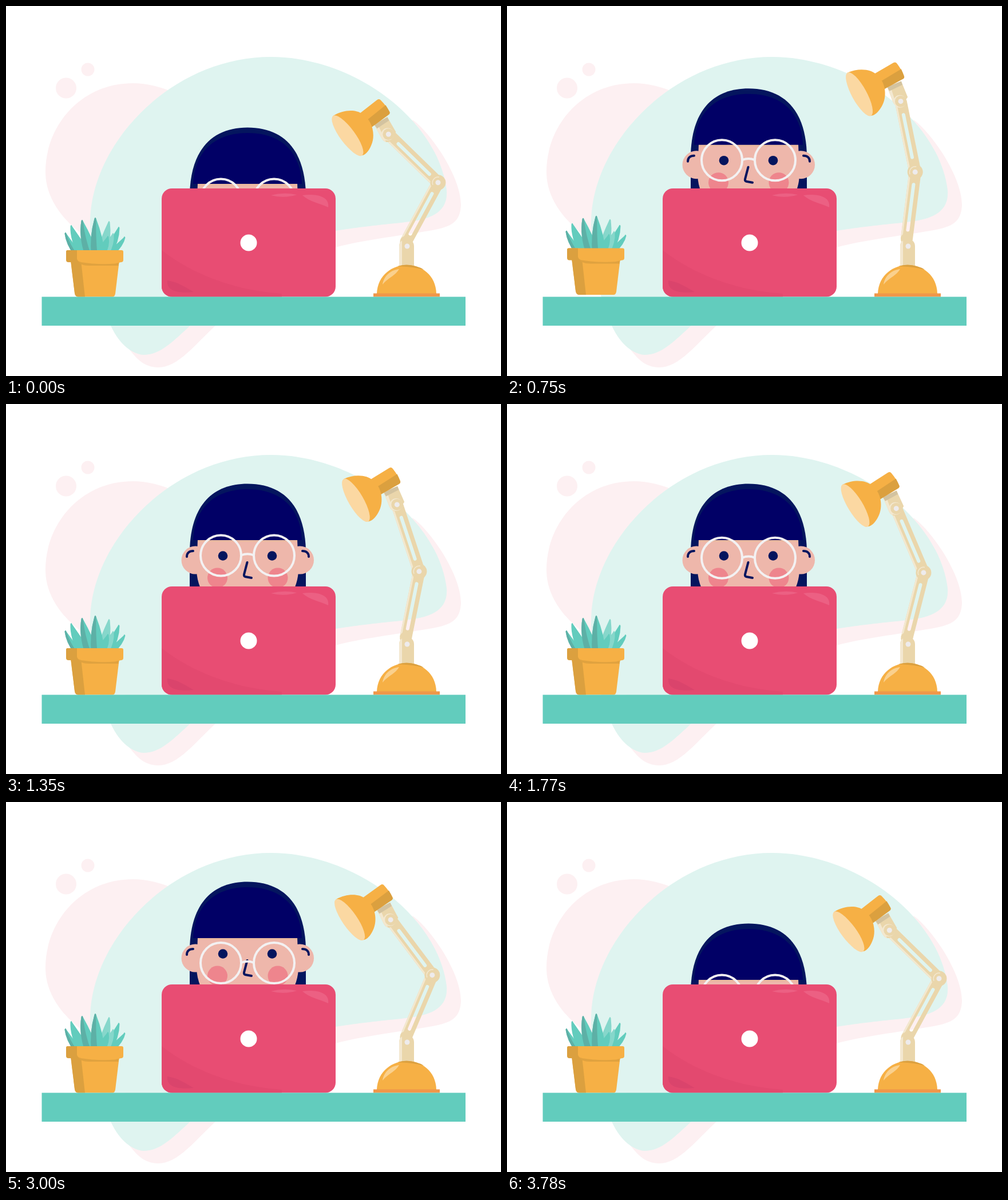
These frames come from a looping animation (865 px wide and 647 px high, 4380 ms). An HTML page:

```html
<!DOCTYPE html>
<html lang="en">
<head>
<meta charset="utf-8">
<title>Peeking over the laptop</title>
<style>
  html, body { margin: 0; width: 100%; height: 100%; overflow: hidden; background: #fff; }
  svg { display: block; width: 100vw; height: 100vh; }
  .amber { fill: #f6b045; }
  .ochre { fill: #dba03f; }
  .sand { fill: #ead6ab; }
  .cream { fill: #f3e8d0; }
  .bolt { fill: #eeebec; }
  .teal { fill: #62ccbd; }
  .deep { fill: #5db0a6; }
  .mint { fill: #86d7cb; }
  .skin { fill: #eeb7ab; }
  .navy { fill: #04155e; }
  .line { fill: none; stroke: #04155e; stroke-width: 4; stroke-linecap: round; stroke-linejoin: round; }
  .frame { fill: none; stroke: #f3f1f2; stroke-width: 4; }
</style>
</head>
<body>
<svg viewBox="0 0 865 647">
  <!-- backdrop -->
  <g fill="#fdf0f2">
    <circle cx="105" cy="143.5" r="18"/>
    <circle cx="143" cy="111" r="11.5"/>
    <path d="M222 135C250 135 280 144 300 155L712 200C745 225 795 300 795 348C794 380 775 387 740 393C680 403 620 410 576 422C480 445 420 510 365 560C330 592 300 633 265 632C240 631 228 616 215 600L165 420C120 395 69 350 69 290C69 210 130 135 222 135Z"/>
  </g>
  <path fill="#dff4f0" d="M463 89C610 89 755 200 770 322C774 372 720 375 690 379C640 384 608 388 576 393C460 415 385 505 322 559C295 583 270 611 240 610C215 608 195 585 183 559C160 510 147 440 147 380C147 240 290 89 463 89Z"/>

  <!-- person -->
  <g id="person">
    <path class="navy" d="M321 335V240C323 160 362 123.500 422 123.500C483 123.500 522 160 524 240V335Z"/>
    <circle class="skin" cx="331" cy="257" r="24.5"/>
    <circle class="skin" cx="513.5" cy="257" r="24.5"/>
    <path class="skin" d="M335 220H509L511 275C510 298 502 313 490 330H354C342 313 334 298 333 275Z"/>
    <path fill="#e9b89f" d="M335 221H509V225H335Z"/>
    <path fill="#010066" d="M327 222C330 162 368 133 422 133C477 133 514 162 517 222Z"/>
    <path class="line" d="M316 251C316 245 320 241 327 241M529 251C529 245 525 241 518 241"/>
    <g fill="#ee858d">
      <circle cx="369.5" cy="288" r="17.5"/>
      <circle cx="475" cy="288" r="17.5"/>
    </g>
    <circle class="navy" cx="379" cy="249.500" r="8.300"/>
    <circle class="navy" cx="465" cy="249.500" r="8.300"/>
    <path class="line" d="M421.500 261L416 282Q415.500 285 418 286L429 288"/>
    <g id="glasses" class="frame">
      <circle cx="375.500" cy="249" r="35.500"/>
      <circle cx="468.500" cy="249" r="35.500"/>
      <path d="M411 248.500Q422 244 433 248.500"/>
    </g>
  </g>

  <!-- plant -->
  <g id="leaves"></g>
  <g id="pot">
    <path class="amber" d="M113 445L120 502Q121 508.500 126 508.500H186Q190 508.500 191 503L198 445Z"/>
    <path class="ochre" d="M113 445H131L138 508.500H126Q121 508.500 120 502Z"/>
    <path fill="#e0a23f" d="M124 445Q129 454 145 454H196.500L198 445Z"/>
    <path class="amber" d="M108 427H202Q205 427 205 430V444Q205 448 201 448L190 450.500Q160 453 124 447L105 444V430Q105 427 108 427Z"/>
    <path class="ochre" d="M108 427H124V442Q125 447 131 448H109Q105 448 105 444V430Q105 427 108 427Z"/>
  </g>

  <!-- lamp -->
  <g id="lower"></g>
  <g id="upper"></g>
  <g id="head">
    <path class="sand" d="M643 207L656 231Q663 243 674 234L681 220L666 194Z"/>
    <path class="cream" d="M643 207L656 231Q660 237 664 238L648 204Z"/>
    <path fill="#d3c3a0" d="M643 207L666 194L669 200L648 214Z"/>
    <path class="amber" d="M616 189L648 164Q652 161 655 165Q664 174 670 185Q671 188 668 190L634 215Z"/>
    <path class="ochre" d="M632 198L663 173Q667 179 670 185Q671 188 668 190L638 212Z"/>
    <path class="amber" d="M571 192C590 180 612 181 621 188C640 198 646 225 638 243C634 253 628 260 622 261Z"/>
    <ellipse fill="#fbd8a2" cx="596.500" cy="226.500" rx="13" ry="43" transform="rotate(-36.500 596.500 226.500)"/>
  </g>
  <g id="joint">
    <circle class="cream" r="11" cx="-1.500"/>
    <circle class="sand" r="10"/>
    <circle class="bolt" r="4.500"/>
  </g>
  <g id="elbow">
    <circle class="sand" r="13.500"/>
    <path fill="none" stroke="#f3e8d0" stroke-width="1.500" d="M-9 4A10 10 0 0 1 2 -9.500"/>
    <circle class="bolt" r="4.500"/>
  </g>
  <path class="sand" d="M687 455V420A13 13 0 0 1 713 420V455Z"/>
  <path class="cream" d="M687 455V420A13 13 0 0 1 692 410V455Z"/>
  <circle class="bolt" cx="701" cy="420" r="4.500"/>
  <path class="amber" d="M648 503C649 470 676 453 700 453C726 453 751 470 752 503Z"/>
  <path class="ochre" d="M684 455Q700 450 716 455Q724 457 730 461Q712 456 684 455Z"/>
  <path fill="#fad08d" d="M658 487C660 473 671 462 687 460C681 471 668 475 658 487Z"/>
  <rect fill="#f0974a" x="642" y="502.500" width="116" height="6"/>

  <!-- laptop and desk -->
  <clipPath id="lid"><rect x="272" y="319" width="304" height="189.500" rx="18"/></clipPath>
  <g clip-path="url(#lid)">
    <rect fill="#e84d73" x="272" y="319" width="304" height="190"/>
    <path fill="#e3496f" d="M272 427C310 457 380 496 482 503V510H272Z"/>
    <path fill="#da446c" d="M282 480C300 482 315 493 328 500C305 502 280 501 282 480Z"/>
    <path fill="#ec6083" d="M463 331Q485 325 508 330Q486 337 463 331ZM518 331C540 328 566 332 563 352C548 345 530 342 518 331Z"/>
  </g>
  <circle cx="424" cy="414" r="14.500" fill="#fff"/>
  <rect class="teal" x="62.500" y="508.500" width="740.500" height="50.500"/>
</svg>
<script>
const LOOP = 4380;
const PIVOT = { x: 680, y: 422, r: 135.8 };
const JOINT = { x: 668, y: 224 };
const SOIL = 436;
const el = id => document.getElementById(id);
const rad = deg => deg * Math.PI / 180;
const clamp = v => Math.max(0, Math.min(1, v));
const part = (t, a, b) => clamp((t - a) / (b - a));
const smooth = p => p * p * (3 - 2 * p);
const hop = (t, a, b, h) => -h * Math.sin(Math.PI * part(t, a, b));
const put = (id, x, y, turn = '') => el(id).setAttribute('transform', `translate(${x} ${y}) ${turn}`);

// Leaf from its tip down to a base of half-width w, with an optional dark left side
function leaf([x, y, base, w, fill, shaded]) {
  const cx = x * 0.65 + base * 0.35;
  const cy = (y + SOIL) / 2;
  const side = (l, r, cls) => `<path class="${cls}" d="M${x - 1.5} ${y + 2}Q${x} ${y - 2} ${x + 1.5} ${y + 2}
    Q${cx + r} ${cy} ${base + r} ${SOIL}H${base - l}Q${cx - l} ${cy} ${x - 1.5} ${y + 2}Z"/>`;
  return side(w, w, fill) + (shaded ? side(w, -w * 0.1, 'deep') : '');
}
el('leaves').innerHTML = [
  [207, 403, 180, 8, 'teal'],
  [197, 386, 175, 9, 'teal'],
  [180, 376, 166, 10, 'mint'],
  [104, 396, 126, 7, 'teal', true],
  [114, 383, 138, 11, 'teal'],
  [133, 374, 150, 12, 'teal', true],
  [156, 370, 161, 12, 'teal', true],
  [187, 397, 170, 9, 'mint'],
  [178, 402, 164, 9, 'teal'],
].map(leaf).join('');

// Slotted bar running down from its own origin
function bar(len, from, to) {
  return `<path class="sand" fill-rule="evenodd" d="M-10.500 0V${len}H10.500V0ZM-3 ${from}a3 3 0 0 1 6 0V${to}a3 3 0 0 1 -6 0Z"/>
    <rect class="cream" x="-10.500" width="3" height="${len}"/>`;
}
el('lower').innerHTML = bar(118, 22, 102) + '<circle class="sand" cy="118" r="10.500"/>';
el('upper').innerHTML = bar(121, 24, 100);

function lamp(t) {
  const s = t < 210 ? smooth(t / 210) : 1 - part(t, 210, 3780);
  const a = rad(33.5 - 22.8 * s);
  const ex = PIVOT.x + PIVOT.r * Math.sin(a);
  const ey = PIVOT.y - PIVOT.r * Math.cos(a);
  const lean = 45.7 - 40.3 * s;
  const push = 10 * s ** 4;
  const reach = 121 + push;
  const jx = ex - reach * Math.sin(rad(lean));
  const jy = ey - reach * Math.cos(rad(lean));
  put('lower', ex, ey, `rotate(${28.4 - 25 * s})`);
  put('elbow', ex, ey);
  put('upper', jx, jy, `rotate(${-lean})`);
  put('joint', jx, jy);
  put('head', jx - push / 4, jy - push, `rotate(${9.3 * s}) translate(${-JOINT.x} ${-JOINT.y})`);
}

function person(t) {
  const rise = smooth(part(t, 370, 930));
  const settle = smooth(part(t, 930, 1290));
  const drop = part(t, 3150, 3690) ** 2;
  put('person', 0, 89 - 90 * rise + 17 * settle + 73 * drop);
  put('glasses', 0, 16.5 * (smooth(part(t, 1590, 2130)) - smooth(part(t, 3360, 3720))));
}

function draw(t) {
  lamp(t);
  person(t);
  put('pot', 0, hop(t, 690, 930, 5));
  put('leaves', 0, hop(t, 690, 1140, 8));
}

const start = performance.now();
function tick() {
  draw((performance.now() - start) % LOOP);
  requestAnimationFrame(tick);
}
tick();
</script>
</body>
</html>
```
